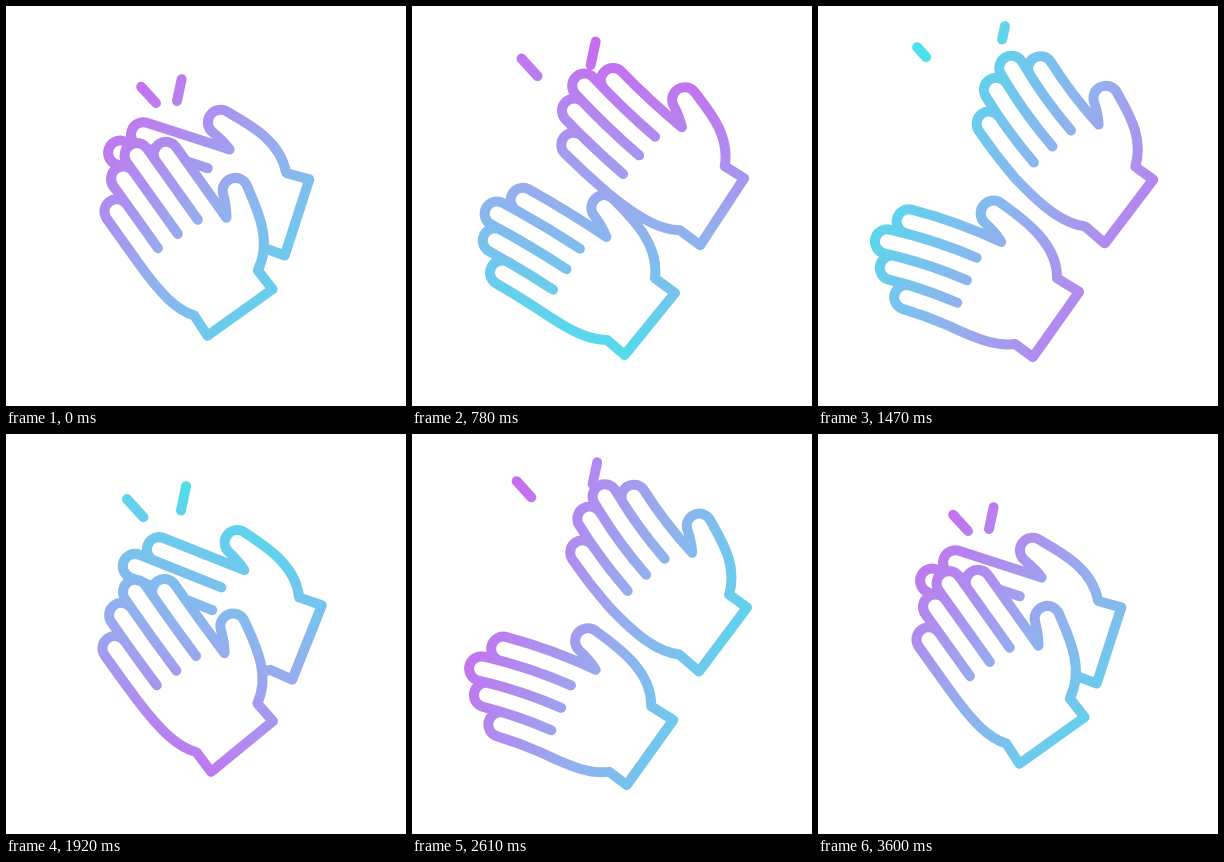
Write an HTML page that moves like this. It is 400 px wide and 400 px high and loops after 3.66 s.

```html
<!DOCTYPE html>
<html lang="en">
<head>
<meta charset="utf-8">
<title>Clapping hands</title>
<style>
  html, body { margin: 0; width: 100%; height: 100%; overflow: hidden; background: #fff; }
  svg { display: block; width: 100vw; height: 100vh; }
  path { fill: none; stroke: url(#ink); stroke-width: 10; stroke-linecap: round; stroke-linejoin: round; }
  path.hand { fill: #fff; }
</style>
</head>
<body>
<svg viewBox="0 0 400 400">
  <defs>
    <linearGradient id="ink" gradientUnits="userSpaceOnUse">
      <stop offset="0" stop-color="#4be1ec"/>
      <stop offset=".5" stop-color="#94afee"/>
      <stop offset="1" stop-color="#c86cf0"/>
    </linearGradient>
  </defs>
  <path id="sparkA"/>
  <path id="sparkB"/>
  <path id="back" class="hand"/>
  <path id="front" class="hand"/>
</svg>
<script>
const LOOP = 3660, END = 3600, CLAP = 600, STEP = 30, TURN = 3100;
const FINGERS = [154, 177, 188, 172], WIDTH = 24.5, EDGE = -54, KNUCKLE = 100;
const CURL = .0021;

// heading: way the fingers point; shift, turn, curl: change from closed to open;
// whip: how far the fingers trail when opening; turnPow, curlPow: closing curves
const HANDS = {
  front: { home: [234, 306.5], heading: 234.5, shift: [4, 12], turn: -19.2, curl: 1,
           whip: 3, turnPow: 1.15, curlPow: 2.8 },
  back: { home: [291, 211.5], heading: 197.9, shift: [20, -6], turn: 19.3, curl: -1,
          whip: 1.5, turnPow: 2, curlPow: 2 }
};

const $ = id => document.getElementById(id);
const clamp = x => Math.min(1, Math.max(0, x));
const smooth = x => { const u = clamp(x); return u * u * (3 - 2 * u); };
const ramp = (t, a, b) => smooth((t - a) / (b - a));
const windUp = (x, k) => { const u = clamp(x); return u * u * ((k + 1) * u - k); };
const add = (a, b, k = 1) => [a[0] + b[0] * k, a[1] + b[1] * k];
const dist = (a, b) => Math.hypot(a[0] - b[0], a[1] - b[1]);
const polar = deg => [Math.cos(deg * Math.PI / 180), Math.sin(deg * Math.PI / 180)];
const text = p => p[0].toFixed(2) + ' ' + p[1].toFixed(2);

// Hand space: f runs from wrist to fingertips, n from little finger to thumb.
// The whole hand is bent along a circle of the given curvature.
function placer([x, y], heading, curvature) {
  const k = curvature || 1e-7;
  const [c, s] = polar(heading);
  return (f, n) => {
    const sin = Math.sin(k * f), cos = Math.cos(k * f);
    const u = sin / k + n * sin, v = (cos - 1) / k + n * cos;
    return [x + u * c - v * s, y + u * s + v * c];
  };
}

function handPath(at) {
  let d = 'M' + text(at(24, -39));
  let pen;
  const line = (f, n) => { pen = at(f, n); d += 'L' + text(pen); };
  const curve = (...pts) => {
    const ps = pts.map(p => at(...p));
    pen = ps[ps.length - 1];
    d += (ps.length === 3 ? 'C' : 'Q') + ps.map(text).join(' ');
  };
  const cap = (f, n) => {
    const p = at(f, n), r = dist(pen, p) / 2;
    d += `A${r} ${r} 0 0 1 ${text(p)}`;
    pen = p;
  };
  const side = (f0, f1, n) => {
    const a = at(f0, n), b = at(f1, n), mid = at((f0 + f1) / 2, n);
    const q = add(add(mid, mid), add(a, b), -.5);
    d += `Q${text(q)} ${text(b)}`;
    pen = b;
  };

  curve([39, -50], [60, EDGE], [KNUCKLE, EDGE]);
  FINGERS.forEach((tip, i) => {
    const n = EDGE + WIDTH * i;
    side(KNUCKLE, tip, n);
    cap(tip, n + WIDTH);
    side(tip, i < 3 ? KNUCKLE : 85, n + WIDTH);
  });
  curve([93, 50], [106, 55]);
  cap(98, 79);
  curve([72, 73.5], [39, 67.5], [24, 39]);
  line(0, 40);
  line(0, -40);
  return d + 'Z';
}

function drawHand(id, phase, gain) {
  const h = HANDS[id];
  const fall = clamp((phase - 300) / 300);
  const shift = gain * (ramp(phase, 40, 200) - ramp(phase, 300, 560));
  const turn = gain * (ramp(phase, 80, 220) - fall ** h.turnPow);
  const bend = gain * (windUp(phase / 200, h.whip) - fall ** h.curlPow);
  const at = placer(add(h.home, h.shift, shift), h.heading + h.turn * turn, CURL * h.curl * bend);
  $(id).setAttribute('d', handPath(at));
}

function drawSpark(id, from, to, phase, burst) {
  const growing = phase > 540;
  const shown = growing || (burst && phase < 495);
  $(id).style.display = shown ? '' : 'none';
  if (!shown) return;
  const head = growing ? .29 * (phase - 540) / 60 : .29 + .71 * smooth(phase / 280);
  const tail = growing ? 0 : smooth(phase / 370);
  const ray = add(to, from, -1);
  const a = add(from, ray, tail), b = add(from, ray, Math.max(head, tail + .001));
  $(id).setAttribute('d', `M${text(a)}L${text(b)}`);
}

function drawInk(t) {
  const dir = polar(225 + 360 * smooth(t / TURN));
  const mid = [207, 208];
  const a = add(mid, dir, -155), b = add(mid, dir, 155);
  Object.entries({ x1: a[0], y1: a[1], x2: b[0], y2: b[1] })
    .forEach(([name, v]) => $('ink').setAttribute(name, v));
}

function render(ms) {
  const t = Math.min(END, Math.floor((ms % LOOP) / STEP) * STEP);
  const clap = Math.min(5, Math.floor(t / CLAP));
  const phase = t - clap * CLAP;
  const last = clap === 5;

  drawHand('back', phase, last ? .17 : 1);
  drawHand('front', phase, last ? .17 : 1);
  drawSpark('sparkA', [150, 97], [99, 41], phase, !last);
  drawSpark('sparkB', [171, 95], [187, 20], phase, !last);
  drawInk(t);
}

const start = performance.now();
function tick() {
  render(performance.now() - start);
  requestAnimationFrame(tick);
}
tick();
</script>
</body>
</html>
```
